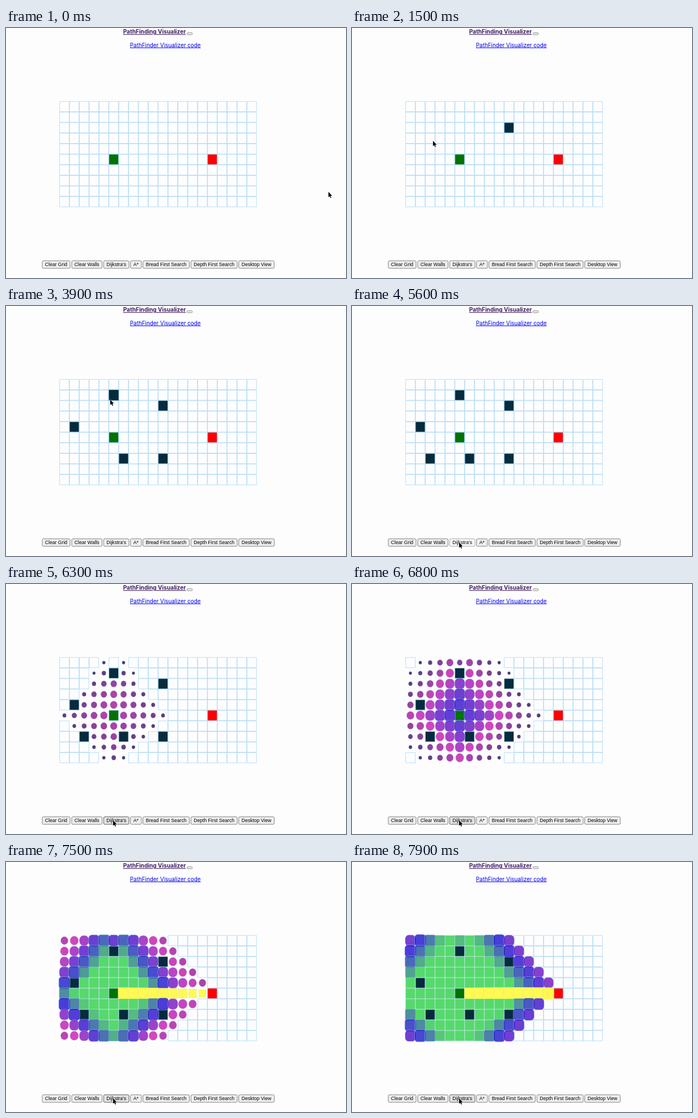
Animation of 600 by 441 pixels, one loop 8 s. Source, as an HTML page with a canvas:

```html
<!DOCTYPE html>
<html lang="en">
<head>
<meta charset="utf-8">
<title>PathFinding Visualizer</title>
<style>
html, body { margin: 0; width: 100%; height: 100%; overflow: hidden; background: #fdfdfe; }
canvas, svg { position: absolute; left: 0; top: 0; width: 600px; height: 441px; }
text { text-anchor: middle; }
.link { font-family: Inter, "Open Sans", sans-serif; text-decoration: underline; }
.button text { font: 8.65px "Liberation Sans", Arial, sans-serif; }
.button rect { fill: #efefef; stroke: #767676; stroke-width: .9; }
.hover rect { fill: #e2e2e2; stroke: #4f4f4f; }
.active rect { fill: #f7f7f7; stroke: #a0a0a0; }
</style>
</head>
<body>
<canvas width="600" height="441"></canvas>
<svg viewBox="0 0 600 441">
  <text class="link" x="262" y="10" font-size="10.1" font-weight="700" fill="#3f2063">PathFinding Visualizer</text>
  <text class="link" x="281.2" y="33.5" font-size="9.9" fill="#0000ee">PathFinder Visualizer code</text>
  <rect x="319.5" y="8.3" width="9.4" height="3.6" rx="1.6" fill="#efefef" stroke="#767676" stroke-width=".8"/>
  <g id="buttons"></g>
  <path id="cursor" d="M0 0V9.4L2.1 7.5 3.6 10.8 5.1 10.2 3.7 6.9H6.5Z" fill="#000" stroke="#fff" stroke-width=".8" paint-order="stroke"/>
</svg>
<script>
const LOOP = 8000, COLS = 20, ROWS = 10;
const LEFT = 94.4, TOP = 129.3, W = 17.4, H = 18.65;
const SEARCH_AT = 5720, VISIT_STEP = 10, VISIT_TIME = 1500;
const PATH_STEP = 50, PATH_TIME = 1500;
const LINE = 'rgb(165,213,242)';
const at = (col, row) => row * COLS + col;
const START = at(5, 5), TARGET = at(15, 5);

// cell and time of placement
const walls = new Map([
  [at(10, 2), 750], [at(1, 4), 1800], [at(6, 7), 2350],
  [at(10, 7), 2950], [at(5, 1), 3650], [at(2, 7), 4450]
]);

// time, x, y of the pointer
const moves = [
  [0, 569, 289], [420, 569, 289], [750, 277, 176], [1000, 277, 176],
  [1500, 143, 199], [1750, 120, 213], [1900, 120, 213], [2300, 207, 269],
  [2450, 207, 269], [2850, 277, 269], [3050, 277, 269], [3600, 189, 157],
  [3750, 188, 158], [3900, 184, 165], [4400, 138, 269], [4700, 138, 269],
  [5380, 189, 417], [LOOP, 189, 417]
];

const canvas = document.querySelector('canvas');
const ctx = canvas.getContext('2d');
const cursor = document.getElementById('cursor');
const buttons = document.getElementById('buttons');

buttons.innerHTML = [
  ['Clear Grid', 64, 113], ['Clear Walls', 116, 169.5], ["Dijkstra's", 172.3, 217],
  ['A*', 219.7, 239], ['Bread First Search', 241.7, 323.5],
  ['Depth First Search', 326.3, 408], ['Desktop View', 410.7, 473.3]
].map(([label, x, end]) => `<g class="button">
  <rect x="${x}" y="410.7" width="${end - x}" height="13.2" rx="1.8"/>
  <text x="${(x + end) / 2}" y="420.2">${label}</text></g>`).join('');
const runButton = buttons.children[2];

function search() {
  const dist = new Map([[START, 0]]);
  const queue = [START];
  for (const cell of queue) {
    const col = cell % COLS, row = (cell - col) / COLS;
    for (const [c, r] of [[col, row - 1], [col + 1, row], [col, row + 1], [col - 1, row]]) {
      const next = at(c, r);
      if (c < 0 || r < 0 || c >= COLS || r >= ROWS || walls.has(next) || dist.has(next)) continue;
      dist.set(next, dist.get(cell) + 1);
      queue.push(next);
    }
  }
  queue.sort((a, b) => dist.get(a) - dist.get(b) || a - b);
  return queue.slice(0, queue.indexOf(TARGET));
}

const visitAt = new Map(search().map((cell, i) => [cell, SEARCH_AT + i * VISIT_STEP]));
const pathStart = SEARCH_AT + visitAt.size * VISIT_STEP;
const pathAt = new Map();
for (let cell = START + 1; cell < TARGET; cell++) {
  pathAt.set(cell, pathStart + (cell - START - 1) * PATH_STEP);
}
visitAt.delete(START);

// value of [position, ...numbers] stops at position p
function track(stops, p, ease = x => x) {
  if (p <= stops[0][0]) return stops[0].slice(1);
  const i = stops.findIndex(s => s[0] >= p);
  if (i < 0) return stops[stops.length - 1].slice(1);
  const a = stops[i - 1], b = stops[i];
  const k = ease((p - a[0]) / (b[0] - a[0]));
  return a.slice(1).map((v, j) => v + (b[j + 1] - v) * k);
}

// the CSS "ease" curve, solved by bisection
function ease(x) {
  let lo = 0, hi = 1, u = x;
  for (let i = 0; i < 16; i++) {
    u = (lo + hi) / 2;
    const bx = .75 * u * (1 - u) ** 2 + .75 * u * u * (1 - u) + u ** 3;
    if (bx < x) lo = u; else hi = u;
  }
  return .3 * u * (1 - u) ** 2 + 3 * u * u * (1 - u) + u ** 3;
}

const visitScale = [[0, .3], [.75, 1.2], [1, 1]];
const visitColor = [[0, 0, 0, 66], [.5, 200, 11, 171], [.75, 14, 0, 204], [1, 33, 205, 62]];
const pathScale = [[0, .6], [.5, 1.2], [1, 1]];
const wallScale = [[0, .3], [.5, 1.2], [1, 1]];

function drawCell(cell, fill, scale = 1, round = 0, lineAlpha = 1) {
  const col = cell % COLS, row = (cell - col) / COLS;
  const r = Math.min(.5, round);
  ctx.save();
  ctx.translate(LEFT + (col + .5) * W, TOP + (row + .5) * H);
  ctx.scale(scale, scale);
  ctx.beginPath();
  ctx.roundRect(-W / 2 + .3, -H / 2 + .3, W - .6, H - .6, { x: r * W, y: r * H });
  if (fill) {
    ctx.fillStyle = fill;
    ctx.fill();
  }
  ctx.globalAlpha = lineAlpha;
  ctx.strokeStyle = LINE;
  ctx.lineWidth = .75;
  ctx.stroke();
  ctx.restore();
}

function drawGrid(t) {
  ctx.clearRect(0, 0, 600, 441);
  const raised = [];
  for (let cell = 0; cell < COLS * ROWS; cell++) {
    if (t >= pathAt.get(cell)) {
      const [s] = track(pathScale, (t - pathAt.get(cell)) / PATH_TIME, ease);
      raised.push([cell, 'rgb(255,249,82)', s, 0, .3]);
    } else if (t >= visitAt.get(cell)) {
      const p = Math.min(1, (t - visitAt.get(cell)) / VISIT_TIME);
      const rgb = track(visitColor, p).map(Math.round);
      raised.push([cell, `rgba(${rgb},.76)`, track(visitScale, p)[0], 1 - p, p < 1 ? .6 : .3]);
    } else if (t >= walls.get(cell)) {
      const p = (t - walls.get(cell)) / 300;
      const [s] = track(wallScale, p);
      if (p < 1) raised.push([cell, 'rgb(5,43,61)', s]);
      else drawCell(cell, 'rgb(5,43,61)');
    } else {
      drawCell(cell, cell === START ? '#007300' : cell === TARGET ? '#ff0000' : null);
    }
  }
  // animated cells lie above the resting ones
  raised.forEach(args => drawCell(...args));
}

function frame(now) {
  const t = now % LOOP;
  drawGrid(t);
  const [x, y] = track(moves, t);
  cursor.setAttribute('transform', `translate(${x} ${y})`);
  const state = t < 5350 ? '' : t > 5550 && t < 5690 ? ' active' : ' hover';
  runButton.setAttribute('class', 'button' + state);
  requestAnimationFrame(frame);
}
requestAnimationFrame(frame);
</script>
</body>
</html>
```
